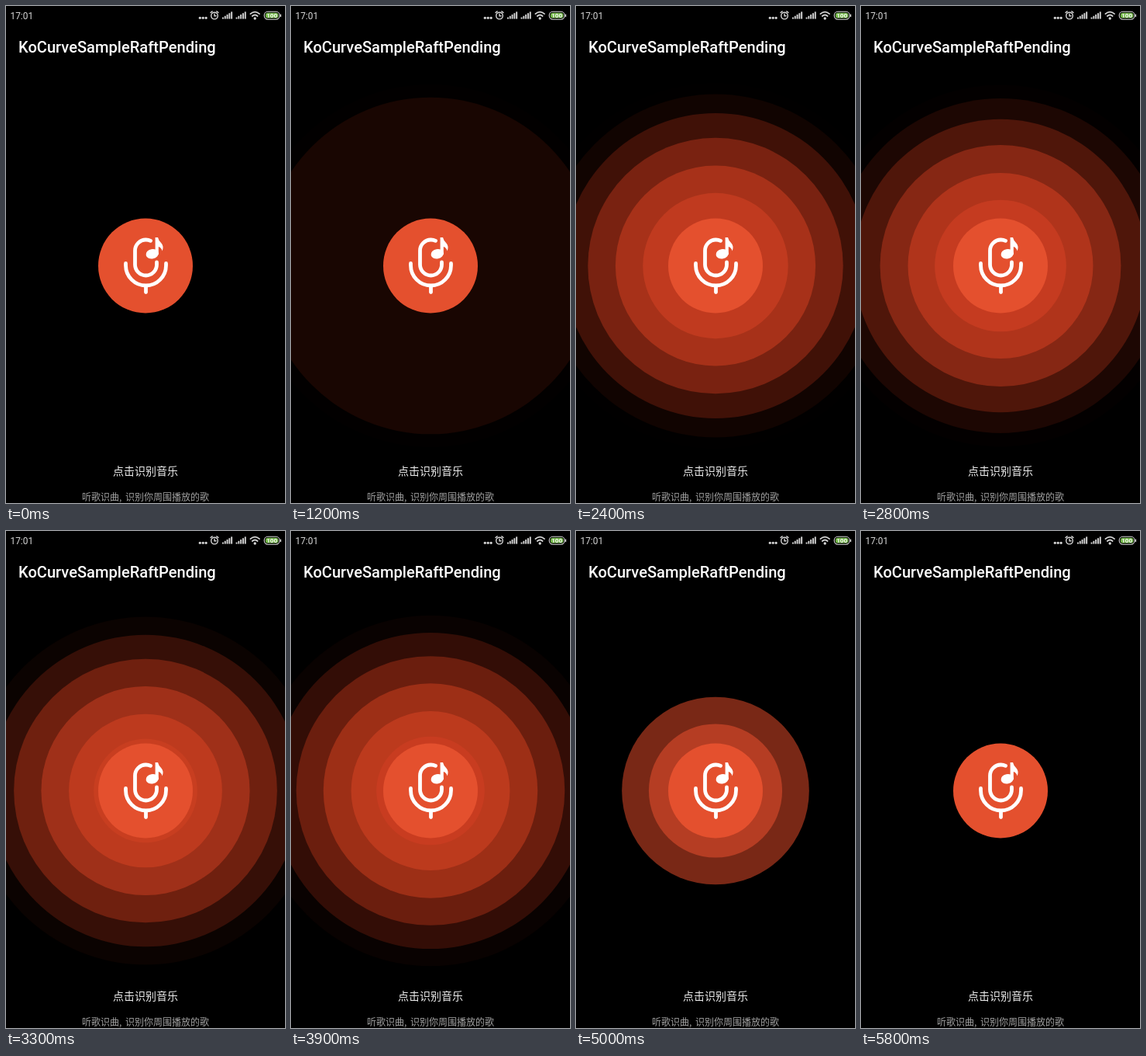
Animation, 360 px wide and 640 px high, one loop 6000 ms. Source, as an HTML page:

```html
<!DOCTYPE html>
<html lang="zh-CN">
<head>
<meta charset="utf-8">
<title>Listening rings</title>
<style>
  html, body { margin: 0; width: 100%; height: 100%; overflow: hidden; background: #000; }
  svg { display: block; width: 100%; height: 100%; }
  .latin { font-family: Roboto, sans-serif; }
  .cjk { font-family: "Noto Sans CJK SC", "Noto Sans CJK", sans-serif; }
  .line { fill: none; stroke: #fff; stroke-width: 4.8; stroke-linecap: round; }
  .thin { fill: none; stroke: #d6d6d6; stroke-width: 1.4; stroke-linecap: round; }
</style>
</head>
<body>
<svg viewBox="0 0 360 640" xmlns="http://www.w3.org/2000/svg">
  <rect width="360" height="640" fill="#000"/>
  <g id="rings"></g>

  <circle cx="180" cy="334.5" r="61" fill="#e4502e"/>
  <g class="line">
    <path d="M186.5 302.3Q184 301 180.5 301A14 14 0 0 0 166.5 315V333A14 14 0 0 0 194.5 333V330"/>
    <path d="M154.5 331.5V334A26 26 0 0 0 206.5 334V331.5"/>
    <path d="M180.5 361V368.5"/>
  </g>
  <ellipse cx="188.7" cy="319.2" rx="8.2" ry="6.2" fill="#fff" transform="rotate(-12 188.7 319.2)"/>
  <path d="M192.6 298H196Q197 302.5 200.5 305.5Q203.8 309 201.8 315.5Q200 310.5 196.8 310V320H192.6Z" fill="#fff"/>

  <g fill="#d6d6d6">
    <text class="latin" x="5.5" y="17" font-size="11.9">17:01</text>
    <circle cx="250.3" cy="15.3" r="1.6"/>
    <circle cx="254.2" cy="15.3" r="1.6"/>
    <circle cx="258.1" cy="15.3" r="1.6"/>
    <g id="bars"></g>
    <circle cx="321.2" cy="16" r="1.7"/>
  </g>
  <g class="thin">
    <circle cx="269" cy="12.6" r="4.3"/>
    <path d="M269 10.2V12.8H271M264 8.6L266.2 6.9M274 8.6L271.8 6.9"/>
    <path stroke-width="1.8" d="M315.4 10.1Q321.2 5.2 327 10.1M317.8 13Q321.2 9.9 324.6 13"/>
  </g>
  <rect x="333.2" y="7.2" width="19.8" height="10" rx="4.6" fill="none" stroke="#d6d6d6" stroke-width="1.1"/>
  <rect x="334.8" y="8.8" width="16.6" height="6.8" rx="3.2" fill="#72b648"/>
  <rect x="353.6" y="10.4" width="1.5" height="3.8" rx=".7" fill="#d6d6d6"/>
  <text class="latin" x="343.1" y="15.1" font-size="8" font-weight="700" fill="#fff" text-anchor="middle">100</text>

  <text class="latin" x="16" y="60" font-size="20.1" font-weight="500" fill="#fff">KoCurveSampleRaftPending</text>
  <text class="cjk" x="180" y="604" font-size="14" fill="#ececec" text-anchor="middle">点击识别音乐</text>
  <g class="cjk" font-size="12" fill="#a2a2a2">
    <text x="98" y="637">听歌识曲,</text>
    <text x="154" y="637">识别你周围播放的歌</text>
  </g>
</svg>
<script>
  const LOOP = 6000, STEP = 100;
  const COUNT = 10, FIRST = 585, GAP = 316, LIFE = 2964;
  const OUTER = 239, TRAVEL = 216, BUTTON = 61;

  function add(parent, name, attrs) {
    const el = document.createElementNS("http://www.w3.org/2000/svg", name);
    for (const key in attrs) el.setAttribute(key, attrs[key]);
    return parent.appendChild(el);
  }

  const bars = document.getElementById("bars");
  for (const left of [279, 296.6]) {
    for (let i = 0; i < 5; i++) {
      const h = 2 + i * 1.8;
      add(bars, "rect", { x: left + i * 2.8, y: 16.6 - h, width: 1.9, height: h });
    }
  }

  const group = document.getElementById("rings");
  const rings = Array.from({ length: COUNT }, () => add(group, "circle", { cx: 180, cy: 334.5 }));

  // Rings enter from outside, ease in and out, and slip under the button.
  function draw(t) {
    rings.forEach((ring, i) => {
      const p = (t - FIRST - i * GAP) / LIFE;
      const ease = (1 - Math.cos(Math.PI * p)) / 2;
      const r = OUTER - TRAVEL * ease;
      const shown = p > 0 && p < 1 && r > BUTTON;
      const alpha = Math.pow(ease, 0.85) * Math.min(1, ease / 0.13);
      ring.setAttribute("r", shown ? r.toFixed(2) : 0);
      ring.setAttribute("opacity", shown ? alpha.toFixed(3) : 0);
      ring.setAttribute("fill", `rgb(202, ${Math.round(55 + 22 * ease)}, ${Math.round(22 + 30 * ease)})`);
    });
  }

  const start = performance.now();
  function tick() {
    const t = (performance.now() - start) % LOOP;
    draw(Math.floor(t / STEP) * STEP);
    requestAnimationFrame(tick);
  }
  tick();
</script>
</body>
</html>
```
